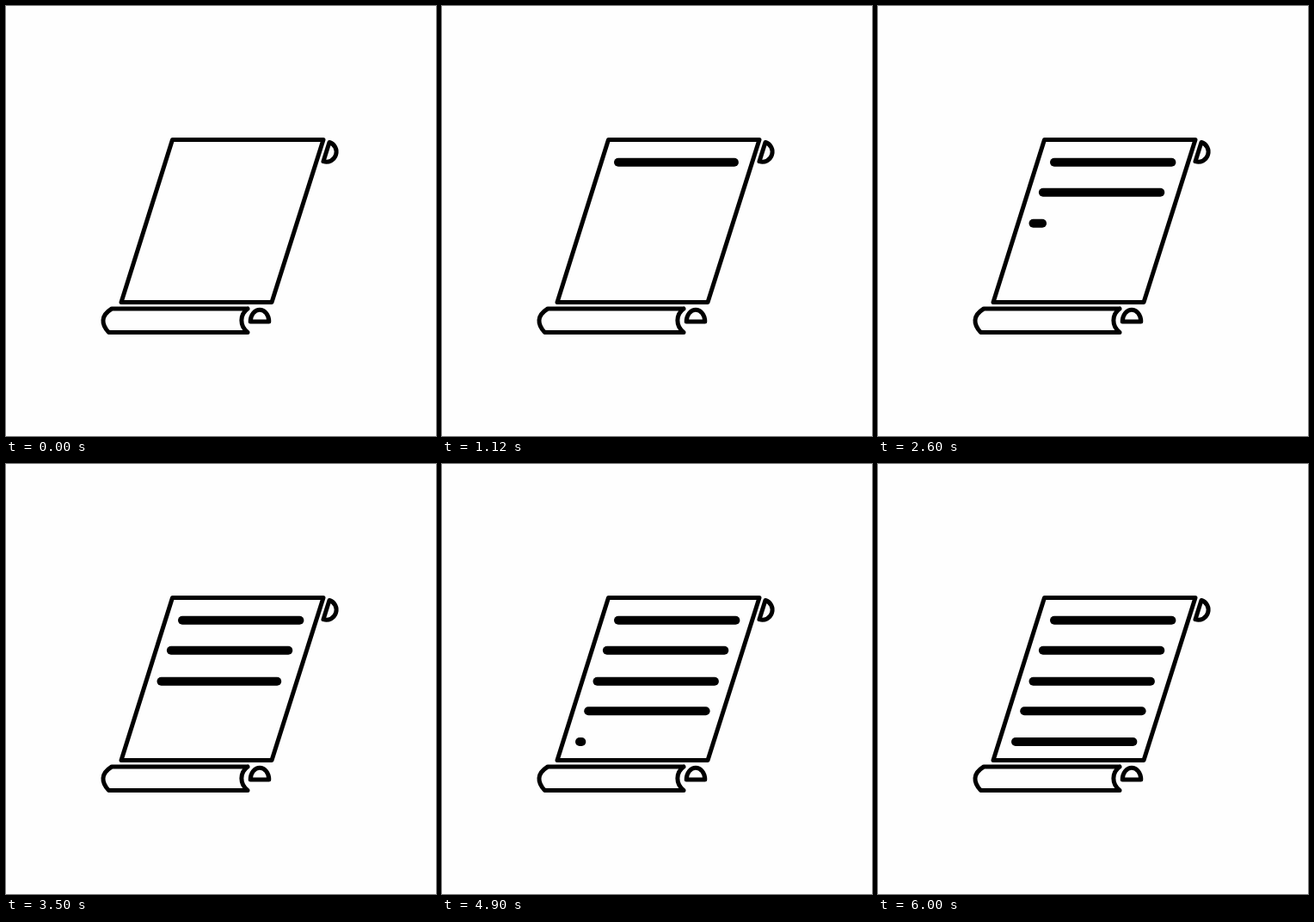
Animation of 500x500 px, one loop 6040 ms. Source, as an HTML page:

```html
<!DOCTYPE html>
<html lang="en">
<head>
<meta charset="utf-8">
<title>Scroll being written</title>
<style>
  html, body { margin: 0; width: 100%; height: 100%; overflow: hidden; background: #fefefe; }
  svg { display: block; width: 100vw; height: 100vh; }
  path { fill: none; stroke: #000; stroke-linecap: round; stroke-linejoin: round; }
  .outline { stroke-width: 5; }
  .bar { stroke-width: 10; }
</style>
</head>
<body>
<svg viewBox="0 0 500 500">
  <g id="scroll">
    <path class="outline" d="M193.5 155.5H369L309 344.5H134Z"/>
    <path class="outline" d="M376 158.5A11.6 11.6 0 0 1 369 180.7Z"/>
    <path class="outline" d="M284.2 367A10.8 13.7 0 0 1 305.8 367Z"/>
    <path class="outline" d="M281 352H123C110 360 110.5 370 119.5 379.5H281C271.5 372 271.5 359 281 352"/>
  </g>
</svg>
<script>
  const LOOP = 6040, DRAW = 1200, LENGTH = 136.4;

  // Left end, height and start time of each written line
  const lines = [
    [205, 181.8, 0],
    [191.9, 216.8, 1200],
    [180.5, 252.8, 2385],
    [170.2, 287.2, 3592],
    [160, 323, 4800]
  ];

  const scroll = document.getElementById('scroll');
  const bars = lines.map(() => {
    const bar = document.createElementNS('http://www.w3.org/2000/svg', 'path');
    bar.setAttribute('class', 'bar');
    return scroll.appendChild(bar);
  });

  const easeInOut = t => (1 - Math.cos(Math.PI * t)) / 2;

  function draw(time) {
    lines.forEach(([x, y, start], i) => {
      const t = Math.min((time - start) / DRAW, 1);
      bars[i].setAttribute('d', t > 0 ? `M${x} ${y}h${easeInOut(t) * LENGTH}` : '');
    });
  }

  const begin = performance.now();
  function tick() {
    const time = (performance.now() - begin) % LOOP;
    draw(Math.floor(time / 20) * 20);
    requestAnimationFrame(tick);
  }
  draw(0);
  requestAnimationFrame(tick);
</script>
</body>
</html>
```
